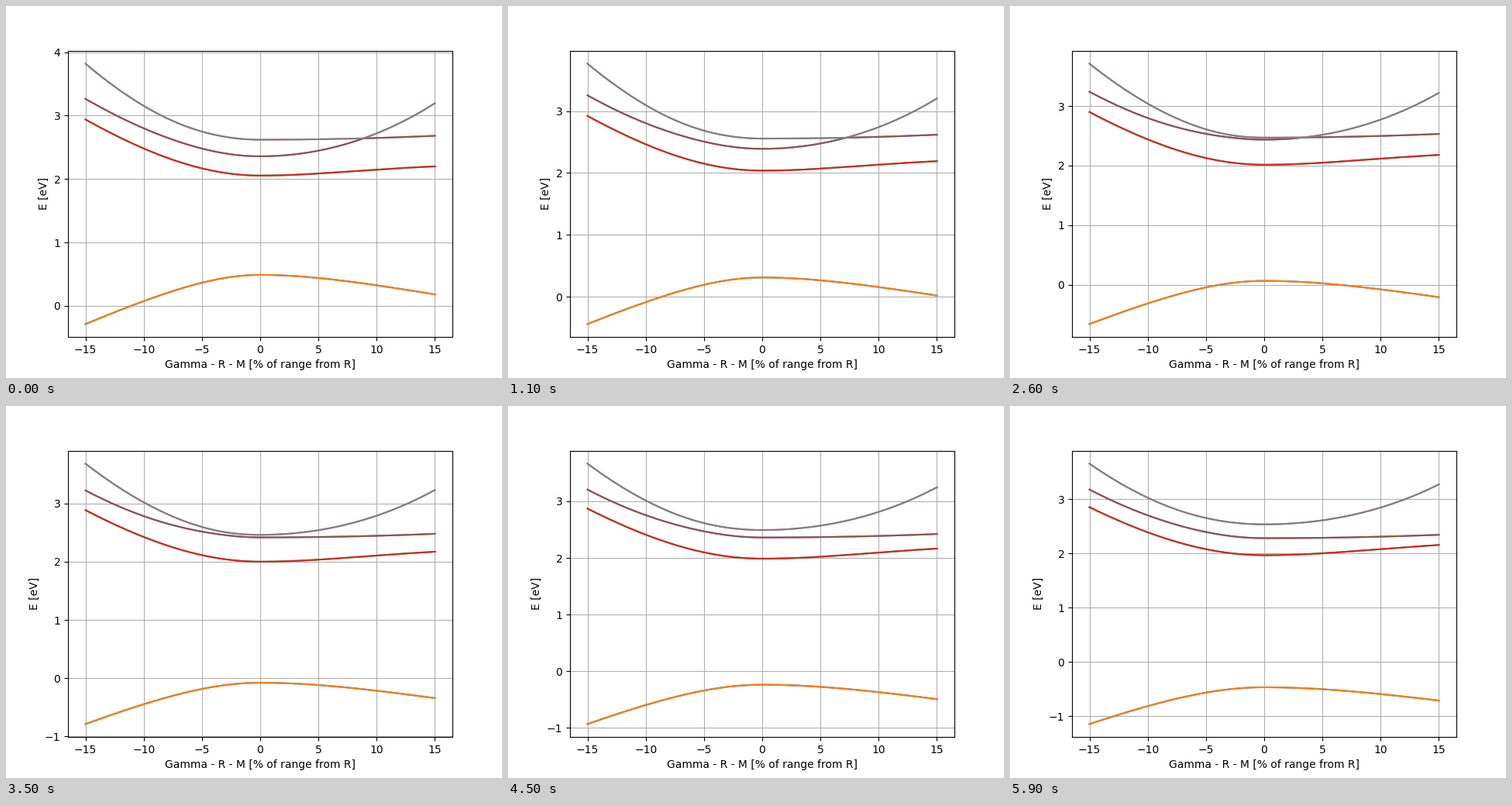
These frames come from a looping animation (640x480 px, 6000 ms). A matplotlib script:

```python
import numpy as np
import matplotlib.pyplot as plt
from matplotlib.animation import FuncAnimation

FRAMES = 60
EDGE = 15                            # plotted distance from R in percent

x = np.linspace(-EDGE, EDGE, 241)
to_gamma = -x[x < 0]
to_m = x[x >= 0]


def rise(s, width, power=0.5):
    """Even profile growing from 0 at R to 1 at the edge."""
    def grow(d):
        return (1 + (d / width) ** 2) ** power - 1
    return grow(s) / grow(EDGE)


def bands(q):
    """The four doubly degenerate bands in eV, lowest first, q from 0 to 1."""
    # Valence band: sinks and flattens.
    top = 0.487 - 0.953 * q
    soft = 8 + 2.5 * q
    valence = (
        top - (0.776 - 0.13 * q + 0.031 * q**2) * rise(to_gamma, soft),
        top - (0.308 - 0.09 * q + 0.026 * q**2) * rise(to_m, soft),
    )

    # Lowest conduction band, split off by spin-orbit coupling.
    base = 2.054 - 0.088 * q
    split = (
        base + 0.885 * rise(to_gamma, 16 + 2 * q),
        base + (0.145 + 0.044 * q) * rise(to_m, 13 + 3.5 * q, -1),
    )

    # Light and heavy bands swap order at R and cross freely towards M.
    light0 = 2.358 + 0.176 * q
    heavy0 = 2.620 - 0.340 * q
    light = light0 + ((0.838 - 0.13 * q + 0.029 * q**2)
                      * rise(to_m, 32 - 10 * q, 1.5))
    heavy = heavy0 + 0.062 * (to_m / EDGE) ** 2

    # Towards Gamma they are coupled and repel each other.
    r = to_gamma / EDGE
    mean = (light0 + heavy0) / 2 + ((1.0535 - 0.09 * q + 0.043 * q**2)
                                    * rise(to_gamma, 25 + 15 * q))
    detuning = (heavy0 - light0) * (1 - 0.124 * r**2) + 0.086 * r**4
    coupling = 0.457 * rise(to_gamma, 10)
    half = np.hypot(detuning, coupling) / 2

    lower = mean - half, np.minimum(light, heavy)
    upper = mean + half, np.maximum(light, heavy)
    return [np.concatenate(b) for b in (valence, split, lower, upper)]


fig, ax = plt.subplots(figsize=(6.4, 4.8), dpi=100)


def draw(step):
    ax.clear()
    for energy in bands(step / (FRAMES - 1)):
        for _ in range(2):           # both spins
            ax.plot(x, energy)
    ax.set_xlabel("Gamma - R - M [% of range from R]")
    ax.set_ylabel("E [eV]")
    ax.grid(True)
    return ax.lines


anim = FuncAnimation(fig, draw, frames=FRAMES, interval=100,
                     init_func=lambda: draw(0), repeat=True, repeat_delay=0)
plt.show()
```
